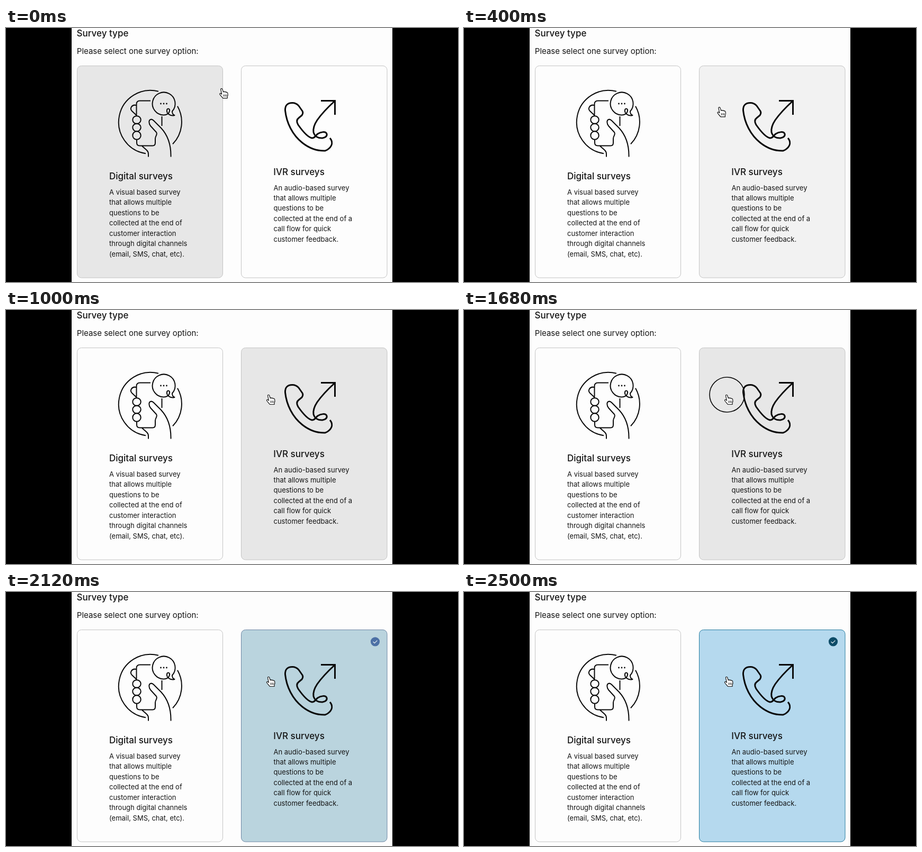
Recreate the animation shown at these times as an HTML page. Size 854 px wide and 480 px high, loop 2600 ms.

```html
<!DOCTYPE html>
<html lang="en">
<head>
<meta charset="utf-8">
<title>Survey type</title>
<style>
  html, body { margin: 0; width: 100%; height: 100%; overflow: hidden; background: #000; }
  svg { display: block; width: 854px; height: 480px; }
  text { font-family: Inter, "Liberation Sans", sans-serif; font-size: 13px; fill: #141414; }
  .head { font-size: 17px; font-weight: 500; }
  .lead { font-size: 15px; }
  .icon { fill: none; stroke: #0a0a0a; stroke-width: 2; stroke-linejoin: round; }
  .thick { stroke-width: 3; }
</style>
</head>
<body>
<svg viewBox="0 0 854 480">
  <rect width="854" height="480"/>
  <rect x="124" width="606" height="480" fill="#fdfdfd"/>
  <text class="head" x="133.5" y="16">Survey type</text>
  <text class="lead" x="133.8" y="48.5">Please select one survey option:</text>

  <rect id="left" x="134.5" y="71.5" width="275" height="400.5" rx="8" stroke="#c4c4c4"/>
  <rect id="right" x="444.5" y="71.5" width="275.5" height="400.5" rx="8"/>

  <g class="icon">
    <path d="M288 119.8A60 60 0 1 0 264 237.2M324 147.8A60 60 0 0 1 315 219.3"/>
    <path d="M298 164.5A21.5 21.5 0 1 1 314 157.5C314 162 316 164 318.5 165
             C311 167 303 162 304 155C305 151 310 152 309 157C308 162 303 164.5 298 164.5"/>
    <path d="M273 137.5H253Q246.5 137.5 246.5 144V166M246 146C238 144 233 152 238 157L246 164.5"/>
    <ellipse cx="247" cy="173.5" rx="7.7" ry="7.3"/>
    <ellipse cx="247" cy="188" rx="7.7" ry="7.3"/>
    <ellipse cx="247" cy="203" rx="7.7" ry="7.7"/>
    <path d="M247 211V217Q247 222.5 253 222.5H277Q282 222.5 282 217V209C282 204 287 201 284 197
             L273 185C269 179 270 174 273 173C275 172 277 173 279 175L293 189
             C306 203 312 220 311.5 243.5M294.5 167V185M257 223L266 231Q269 234 269 238V243.5"/>
  </g>
  <g fill="#0a0a0a">
    <circle cx="292.5" cy="143" r="1.4"/><circle cx="298" cy="143" r="1.4"/><circle cx="303.5" cy="143" r="1.4"/>
  </g>
  <g class="icon thick">
    <path d="M621 138C608 150 595 164 588 174C582 183 580 190 581 197C583 205 590 208.5 598 208
             C604 207 607 204 606 200C604 195 595 196 589 200C584 204 584 208 578 208
             C569 206 559 193 552 183C549 178 549 173 553 170L559 165Q562 161 560 157L553 147
             Q548 141.5 541 141.5C531 141.5 527 147 527.5 156C530 179 541 202 560 217
             C574 228 589 232.5 603 232Q607 231 611 227C616 222 618 215 612 208"/>
    <path d="M595 137.5H621.5V164" style="stroke-linejoin:miter"/>
  </g>

  <text class="head" x="195" y="286">Digital surveys</text>
  <text class="head" x="505.3" y="277.6">IVR surveys</text>
  <g id="copy"></g>

  <g id="badge">
    <circle id="disc" cx="697.5" cy="93.8" r="8.6"/>
    <path d="M693.7 94l2.6 2.6l5-5" fill="none" stroke="#e6eef2" stroke-width="1.3"/>
  </g>
  <circle id="ring" cx="497" cy="160" r="33" fill="none" stroke="#0a0a0a" stroke-width="1.6"/>
  <g id="hand" stroke="#111" stroke-width="1.2" fill="#fff" stroke-linejoin="round">
    <path d="M-5.6-8C-5-9.8-3-9.5-2.4-8L-.6-2.6C0-4 2-3.8 2.4-2.4C3-3.6 5-3 5.2-1.8
             C6-2.8 7.6-1.6 7.7-.2C8.2 2 8 4 7 6V9H-1.5C-3 7-5 5-7.2 2
             C-8.2.4-6.5-.8-5 .4L-3.6 1.6Z"/>
    <path d="M0 2V6M2.6 2V6M5 2V6" stroke-width="1"/>
  </g>
</svg>
<script>
const LOOP = 2600;
const $ = id => document.getElementById(id);

function addLines(x, y, lines) {
  lines.forEach((line, i) => {
    const t = document.createElementNS("http://www.w3.org/2000/svg", "text");
    t.setAttribute("x", x);
    t.setAttribute("y", y + i * 19.43);
    t.textContent = line;
    $("copy").append(t);
  });
}
addLines(195, 315, ["A visual based survey", "that allows multiple", "questions to be",
  "collected at the end of", "customer interaction", "through digital channels", "(email, SMS, chat, etc)."]);
addLines(505.5, 306.6, ["An audio-based survey", "that allows multiple", "questions to be",
  "collected at the end of a", "call flow for quick", "customer feedback."]);

const PAPER = [253, 253, 253], HOVER = [231, 231, 231], PRESSED = [200, 200, 200],
      MIXED = [186, 212, 222], BLUE = [181, 217, 238];

// Each track is a list of [time, colour] keys.
const tracks = {
  left: [[120, HOVER], [400, PAPER]],
  right: [[270, PAPER], [540, HOVER], [1740, HOVER], [1940, PRESSED], [2030, PRESSED],
          [2120, MIXED], [2220, MIXED], [2500, BLUE]],
  edge: [[1740, [196, 196, 196]], [1940, [150, 150, 155]], [2120, [110, 135, 165]],
         [2220, [110, 135, 165]], [2500, [40, 125, 160]]],
  disc: [[2120, [76, 112, 165]], [2220, [76, 112, 165]], [2500, [13, 76, 104]]]
};

function colour(keys, t) {
  const next = keys.findIndex(k => k[0] > t);
  if (next === 0) return `rgb(${keys[0][1]})`;
  if (next < 0) return `rgb(${keys[keys.length - 1][1]})`;
  const [t0, a] = keys[next - 1], [t1, b] = keys[next];
  return `rgb(${a.map((v, i) => Math.round(v + (b[i] - v) * (t - t0) / (t1 - t0)))})`;
}

function draw(now) {
  const t = now % LOOP;
  $("left").setAttribute("fill", colour(tracks.left, t));
  $("right").setAttribute("fill", colour(tracks.right, t));
  $("right").setAttribute("stroke", colour(tracks.edge, t));
  $("disc").setAttribute("fill", colour(tracks.disc, t));

  const rest = Math.max(0, 1 - t / 580);
  const x = 500 - 89 * rest ** 1.6, y = 169.5 - 46 * rest ** 1.25;
  $("hand").setAttribute("transform", `translate(${x} ${y})`);

  $("ring").style.display = t >= 1680 && t < 2000 ? "" : "none";
  $("badge").style.opacity = Math.min(1, Math.max(0, (t - 2030) / 80));
  requestAnimationFrame(draw);
}
draw(0);
</script>
</body>
</html>
```
